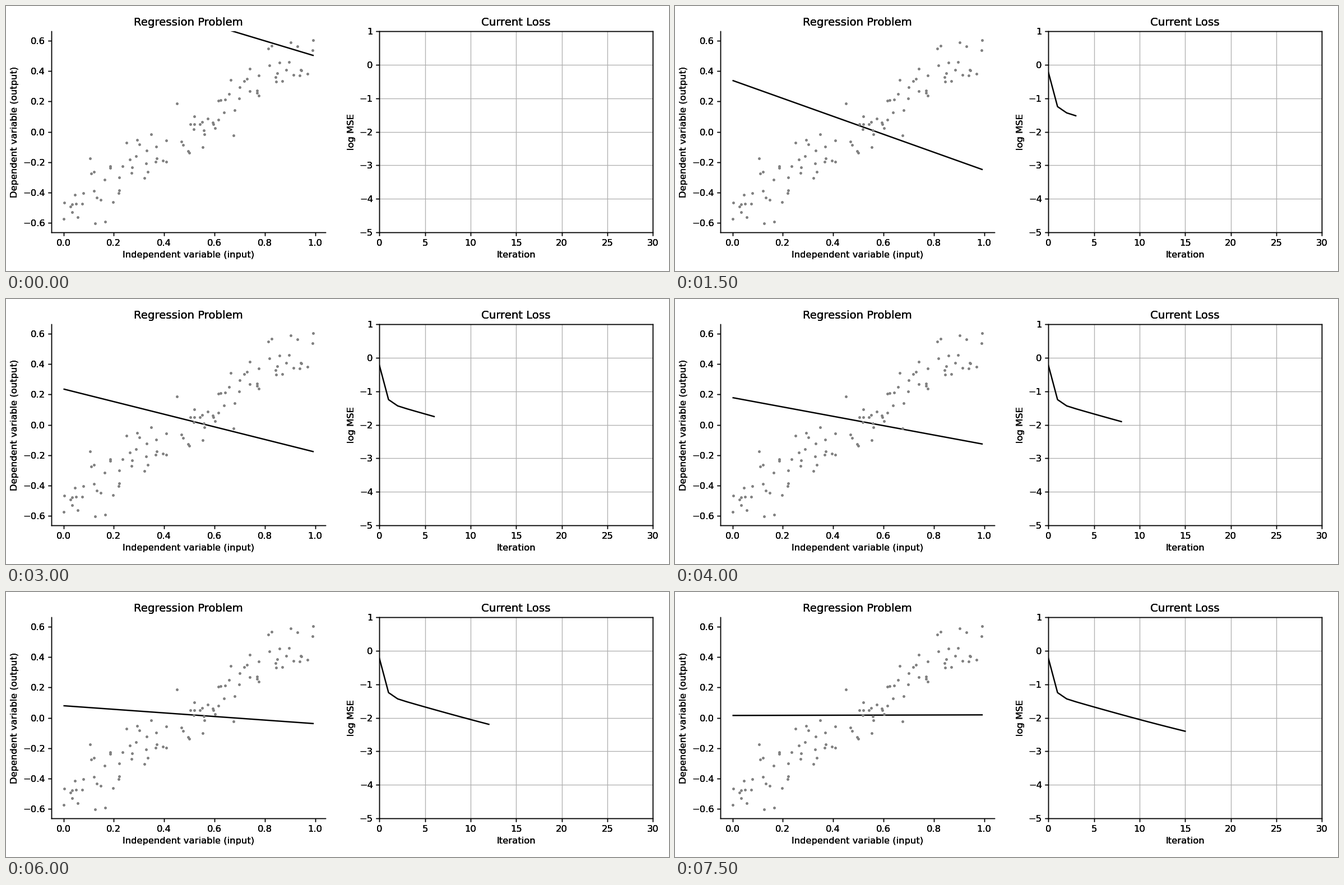
These frames come from a looping animation (1183 px wide and 473 px high, 8 s). A matplotlib script:

```python
import numpy as np
import matplotlib.pyplot as plt
from matplotlib.animation import FuncAnimation

W, H, DPI = 1183, 473, 118.3
STEPS = 16
POINTS = 100
TOP, BOTTOM = 44.8, 404.3
INK_LAYERS = 3

# Noisy linear sample, with a small gap left of the middle
rng = np.random.default_rng(3)
rank = np.arange(POINTS)
xs = np.interp(rank, [0, 20, 43, 44, 70, 99],
               [0.0025, 0.187, 0.412, 0.459, 0.684, 0.9915])
xs[1:-1] += rng.normal(0, 0.008, POINTS - 2)
ys = np.clip(1.08 * xs - 0.545 + rng.normal(0, 0.1, POINTS), -0.604, 0.604)

# Gradient descent on a line has two decaying modes, one slow and one fast
n = np.arange(STEPS)
slow, fast = 0.9577 ** n, 0.245 ** n
bias = -0.4484 + 0.887 * slow + 0.5614 * fast
weight = 0.8877 - 1.69 * slow + 0.3023 * fast
loss = np.log(0.0207 + 0.256 * slow ** 2 + 0.518 * fast ** 2)

plt.rcParams.update({"font.family": "DejaVu Sans", "font.size": 10})
fig = plt.figure(figsize=((W + 1e-6) / DPI, (H + 1e-6) / DPI), dpi=DPI,
                 facecolor="white")


def add_panel(left, right, title, xlabel, ylabel, open_box=False, **scales):
    """Stack identical axes so that text and spines get hard, dark edges."""
    rect = [left / W, 1 - BOTTOM / H, (right - left) / W, (BOTTOM - TOP) / H]
    layers = [fig.add_axes(rect, label=f"{title} {k}", facecolor="none")
              for k in range(INK_LAYERS)]
    for ax in layers:
        ax.set(title=title, xlabel=xlabel, ylabel=ylabel, **scales)
        if open_box:
            ax.spines[["top", "right"]].set_visible(False)
    return layers[0]


fit_ax = add_panel(81.4, 570.2, "Regression Problem",
                   "Independent variable (input)", "Dependent variable (output)",
                   open_box=True, xlim=(-0.0472, 1.0412), ylim=(-0.6645, 0.6645),
                   xticks=np.linspace(0, 1, 6), yticks=np.linspace(-0.6, 0.6, 7))
fit_ax.scatter(xs, ys, s=9, c="gray", linewidths=0, zorder=3)
fit_line, = fit_ax.plot([], [], color="black")

loss_ax = add_panel(666.3, 1154.3, "Current Loss", "Iteration", "log MSE",
                    xlim=(0, 30), ylim=(-5, 1),
                    xticks=range(0, 31, 5), yticks=range(-5, 2))
loss_ax.grid()
loss_line, = loss_ax.plot([], [], color="black")

ends = xs[[0, -1]]


def update(i):
    fit_line.set_data(ends, bias[i] + weight[i] * ends)
    loss_line.set_data(n[:i + 1], loss[:i + 1])
    loss_line.set_visible(i > 0)
    return fit_line, loss_line


anim = FuncAnimation(fig, update, frames=STEPS, interval=500, repeat=True)
plt.show()
```
